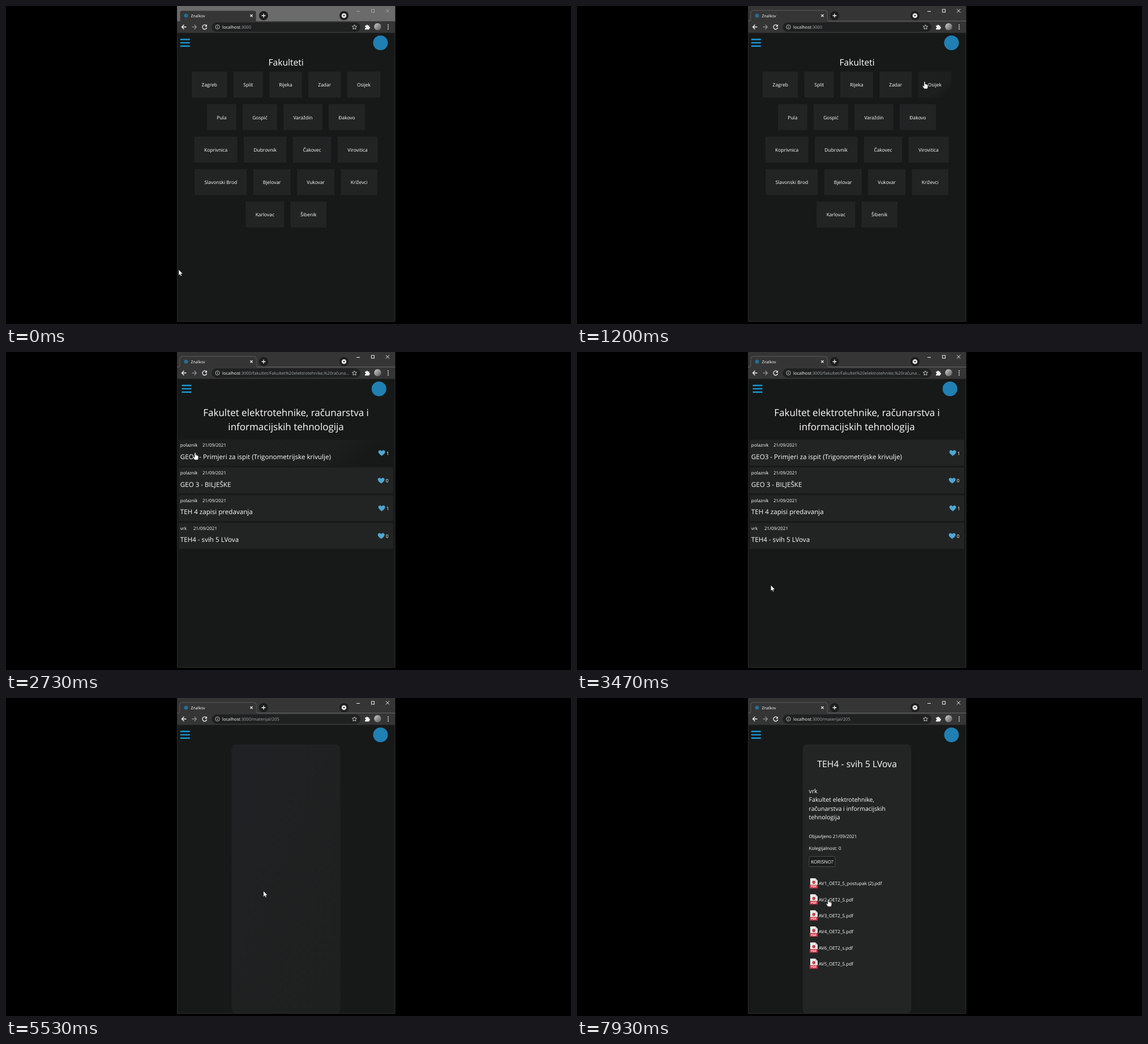
Write an HTML page that moves like this. It is 998x561 px and loops after 8 s.

```html
<!DOCTYPE html>
<html lang="hr">
<head>
<meta charset="utf-8">
<title>Fakulteti</title>
<style>
  html, body { margin: 0; width: 100%; height: 100%; overflow: hidden; background: #000; }
  svg { display: block; }
  text {
    font-family: "Open Sans", "Noto Sans", sans-serif; fill: #fff;
    text-rendering: geometricPrecision; pointer-events: none; white-space: pre;
  }
  .mid { text-anchor: middle; }
  .dim { fill: #a3a6a9; }
  .tile { fill: #222424; }
  .tile.on { fill: url(#hover); }
  .link { fill: transparent; }
  .line { fill: none; stroke: #f1f1f1; stroke-width: 1.3; }
  .bars { stroke: #179bd8; stroke-width: 2.4; }
  .brand { fill: #2080b3; }
  #strip { fill: #353535; }
  #controls { stroke: #f1f1f1; stroke-width: 1; fill: none; }
  .idle #strip { fill: #6b6b6b; }
  .idle #controls { stroke: #a5a5a5; }
  #cursor, #cursor * { pointer-events: none; }
</style>
</head>
<body>
<svg id="stage" width="998" height="561" viewBox="0 0 998 561">
  <defs>
    <linearGradient id="hover" gradientUnits="userSpaceOnUse">
      <stop stop-color="#1e2020"/><stop offset=".65" stop-color="#1d1f1f"/><stop offset=".85" stop-color="#171918"/>
    </linearGradient>
    <linearGradient id="loading" x2="1" y2="1">
      <stop stop-color="#202126"/><stop offset=".3" stop-color="#1f2122"/><stop offset="1" stop-color="#1e201f"/>
    </linearGradient>
    <linearGradient id="photo" x2="1" y2="1">
      <stop stop-color="#d0d0ce"/><stop offset="1" stop-color="#575755"/>
    </linearGradient>
    <path id="heart" d="M6 10.5C2 7.6 0 5.8 0 3.2 0 .2 4.2-.8 6 2 7.8-.8 12 .2 12 3.2 12 5.8 10 7.6 6 10.5z" fill="#4ba8d3"/>
    <g id="pdf">
      <path d="M1 0h9l4 4v13H1z" fill="#f0eeec"/>
      <path d="M10 0v4h4z" fill="#c4c1bf"/>
      <circle cx="7.3" cy="7.2" r="2.8" fill="#c9404b"/>
      <path d="M0 11.5h14.2v6.5H0z" fill="#c93a48"/>
      <text class="mid" x="7.1" y="16.6" font-size="5" font-weight="700">PDF</text>
    </g>
  </defs>

  <rect width="998" height="561"/>
  <rect x="302" width="385.5" height="557" fill="#171918"/>

  <g id="chrome">
    <rect id="strip" x="302" width="385.5" height="28"/>
    <rect x="302" y="27" width="385.5" height="20.5" fill="#353535"/>
    <path d="M302 26.5h2q3 0 3-3V12q0-4 4-4h127q4 0 4 4v11.5q0 3 3 3h242.5" fill="none" stroke="#666"/>
    <path d="M307.5 27V12q0-3.5 3.5-3.5h127q3.5 0 3.5 3.5v15z" fill="#353535"/>
    <circle class="brand" cx="318" cy="17" r="3.6" opacity=".75"/>
    <text x="326.5" y="19.5" font-size="7">Znalkov</text>
    <path class="line" d="M431.5 15l4 4m0-4l-4 4"/>
    <circle cx="455" cy="17" r="8" fill="#1c1d1d"/>
    <path class="line" d="M451.5 17h7M455 13.5v7"/>
    <circle cx="597" cy="17" r="8" fill="#1c1d1d"/>
    <circle cx="597" cy="17" r="4.3" fill="#e0e0e0"/>
    <path d="M595 16h4l-2 2.5z" fill="#222"/>
    <g id="controls">
      <path d="M619 9.5h6M671 5.5l6 6m0-6l-6 6"/>
      <rect x="645.5" y="6" width="5" height="5"/>
    </g>
    <path class="line" d="M318.5 37H310.5m4-4l-4 4 4 4"/>
    <path class="line" style="stroke:#898b8d" d="M328.5 37h8m-4-4l4 4-4 4"/>
    <path class="line" d="M354 34.7a3.9 3.9 0 1 0 .7 3.3"/>
    <path d="M355 32.5v4h-4z" fill="#f1f1f1"/>
    <rect x="363.5" y="29" width="262.5" height="16.5" rx="8.25" fill="#1f2020"/>
    <circle cx="373.5" cy="37" r="3.7" fill="none" stroke="#c8c8c8" stroke-width=".9"/>
    <path d="M373.5 36.5v2.5m0-4.2v.9" stroke="#c8c8c8"/>
    <text x="382" y="39.7" font-size="7.57">localhost<tspan class="dim" id="url"></tspan></text>
    <path d="M615.5 33l1.2 2.7 2.9.3-2.2 2 .6 2.9-2.5-1.5-2.5 1.5.6-2.9-2.2-2 2.9-.3z" fill="none" stroke="#ddd" stroke-width=".9"/>
    <path d="M634 34.5h2.3a1.5 1.5 0 0 1 3 0h2.2v2.2a1.5 1.5 0 0 1 0 3V41.5H634v-2.2a1.5 1.5 0 0 0 0-3z" fill="#f1f1f1"/>
    <circle cx="656.5" cy="36.5" r="6.2" fill="url(#photo)"/>
    <g fill="#f1f1f1"><circle cx="675" cy="33.5" r="1"/><circle cx="675" cy="37" r="1"/><circle cx="675" cy="40.5" r="1"/></g>
  </g>

  <path id="menu" class="bars" d="M307.8 59h17m-17 5.9h17m-17 5.9h17"/>
  <circle id="logo" class="brand" cx="661.5" cy="65" r="13"/>

  <g id="cities"></g>
  <g id="faculties"></g>
  <g id="posts"></g>
  <g id="post"></g>

  <path d="M302.5 47V556.5H687V47" fill="none" stroke="#2a2c2c"/>

  <g id="cursor">
    <path id="arrow" d="M0 0V10.3L2.4 8.2 3.9 11.6 5.6 10.9 4.1 7.6H7.3z" fill="#fff" stroke="#000" stroke-width=".5"/>
    <path id="hand" d="M-1 1Q0-.6 1 1V5q1.2-.8 1.8.3 1.2-.6 1.7.4 1.3-.3 1.3 1V10L4.8 13H-.7L-3.6 8.8Q-3.6 7.2-2.2 7.7L-1 9z" fill="#fff" stroke="#111" stroke-width=".5"/>
  </g>
</svg>

<script>
const LOOP = 8000, CENTER = 494.6;
const $ = id => document.getElementById(id);

const text = (x, mid, size, str, cls = "") =>
  `<text x="${x}" y="${mid + size * 0.36}" font-size="${size}" class="${cls}">${str}</text>`;
const rect = (x, y, w, h, rest) => `<rect x="${x}" y="${y}" width="${w}" height="${h}" ${rest}/>`;

// Rows of centred tiles; each tile is [label, width].
function tileRows(rows) {
  const gap = 11.3;
  return rows.map((row, i) => {
    const y = 115.8 + i * 57.3;
    let x = CENTER - (row.reduce((sum, tile) => sum + tile[1], 0) + gap * (row.length - 1)) / 2;
    return row.map(([label, w]) => {
      const out = rect(x, y, w, 45.8, 'class="tile hot"') + text(x + w / 2, y + 23.4, 8.45, label, "mid");
      x += w + gap;
      return out;
    }).join("");
  }).join("");
}

$("cities").innerHTML = text(CENTER, 99.5, 15.6, "Fakulteti", "mid") + tileRows([
  [["Zagreb", 62.5], ["Split", 52], ["Rijeka", 57.7], ["Zadar", 57.3], ["Osijek", 58.5]],
  [["Pula", 51.5], ["Gospić", 61], ["Varaždin", 68.5], ["Đakovo", 64]],
  [["Koprivnica", 76], ["Dubrovnik", 75.5], ["Čakovec", 67.5], ["Virovitica", 71]],
  [["Slavonski Brod", 92], ["Bjelovar", 66], ["Vukovar", 66.3], ["Križevci", 64.3]],
  [["Karlovac", 68], ["Šibenik", 63.3]]
]);

$("faculties").innerHTML = text(CENTER, 99.5, 15.6, "Osijek", "mid") + tileRows([
  [["Ekonomski fakultet", 110], ["Pravni fakultet", 95]],
  [["Fakultet elektrotehnike, računarstva i informacijskih tehnologija", 300]],
  [["Medicinski fakultet", 112], ["Filozofski fakultet", 110]],
  [["Građevinski i arhitektonski fakultet", 180]],
  [["Prehrambeno-tehnološki fakultet", 166]],
  [["Fakultet agrobiotehničkih znanosti", 178]],
  [["Odjel za matematiku", 118], ["Odjel za fiziku", 96]]
]);

const posts = [
  ["polaznik", 347, "GEO3 - Primjeri za ispit (Trigonometrijske krivulje)", 1],
  ["polaznik", 347, "GEO 3 - BILJEŠKE", 0],
  ["polaznik", 347, "TEH 4 zapisi predavanja", 1],
  ["vrk", 331, "TEH4 - svih 5 LVova", 0]
];
$("posts").innerHTML =
  text(CENTER, 107, 17, "Fakultet elektrotehnike, računarstva i", "mid") +
  text(CENTER, 131.5, 17, "informacijskih tehnologija", "mid") +
  `<g id="rows">${posts.map(([user, dateX, title, likes], i) => {
    const y = 154.8 + i * 48.8, heartX = 656.7 + likes;
    return rect(305, y, 379, 46, 'rx="2" class="tile hot"') +
      text(307.8, y + 9.5, 7.9, user) + text(dateX, y + 9.5, 7.9, "21/09/2021") +
      text(307.8, y + 29.8, 11.6, title) +
      `<use href="#heart" x="${heartX}" y="${y + 18}"/>` +
      text(heartX + 14, y + 23.7, 8.5, likes);
  }).join("")}</g>`;

const files = ["AV1_OET2_S_postupak (2)", "AV2_OET2_S", "AV3_OET2_S", "AV4_OET2_S", "AV6_OET2_s", "AV5_OET2_S"];
const about = ["vrk", "Fakultet elektrotehnike,", "računarstva i informacijskih", "tehnologija"];
$("post").innerHTML =
  rect(398.5, 81.7, 192, 475, 'rx="8" id="card"') +
  `<g id="details">` +
  text(CENTER, 116.8, 15.8, "TEH4 - svih 5 LVova", "mid") +
  about.map((line, i) => text(409.6, 164 + i * 15.4, 10.55, line)).join("") +
  text(409.6, 243.7, 8.05, "Objavljeno 21/09/2021") +
  text(409.6, 264.8, 8.1, "Kolegijalnost: 0") +
  rect(410, 279.5, 46, 18, 'rx="2" fill="#1b1d1d" stroke="#4b4d4d"') +
  text(433, 288.9, 8.3, "KORISNO?", "mid") +
  files.map((name, i) => {
    const y = 327.4 + i * 28.35;
    return `<use href="#pdf" x="411" y="${y - 9.5}"/>` + text(427, y, 8.14, name + ".pdf") +
      rect(411, y - 10, i ? 79 : 128, 20, 'class="link hot"');
  }).join("") + `</g>`;

// [start, page, address after the host]
const pages = [
  [0, "cities", ":3000"],
  [1330, "faculties", ":3000/grad/Osijek"],
  [2330, "posts", ":3000/fakultet/Fakultet%20elektrotehnike,%20računa..."],
  [5470, "post", ":3000/materijal/205"]
];

// Pointer tip: [time, x, y]
const path = [
  [0, 305, 465], [70, 305, 465], [870, 614, 133], [1330, 614, 133], [1730, 560, 150],
  [2070, 352, 183], [2660, 352, 183], [2730, 334, 177], [3530, 343, 430], [3600, 343, 431],
  [4530, 343, 431], [4600, 358.5, 415], [5130, 455, 340], [5530, 455, 340], [5730, 400, 420],
  [6000, 353, 451], [6200, 353, 451], [6330, 348.5, 448], [6600, 348.5, 448], [7000, 364, 395.5],
  [7470, 433, 346], [7600, 440, 346], [7800, 440, 346], [7930, 444, 355], [LOOP, 444, 355]
];

function pointerAt(t) {
  const i = path.findIndex(key => key[0] > t);
  const [t0, x0, y0] = path[i - 1], [t1, x1, y1] = path[i];
  const k = (t - t0) / (t1 - t0);
  return [x0 + (x1 - x0) * k, y0 + (y1 - y0) * k];
}

const show = (id, on) => { $(id).style.display = on ? "" : "none"; };

// Lays the hover gradient at 45 degrees across the box, corner to corner.
function highlight(el) {
  const { x, y, width, height } = el.getBBox();
  const cx = x + width / 2, cy = y + height / 2, r = (width + height) / 4;
  const ends = { x1: cx - r, y1: cy - r, x2: cx + r, y2: cy + r };
  for (const key in ends) $("hover").setAttribute(key, ends[key]);
  el.classList.add("on");
}

function draw(now) {
  const t = now % LOOP;
  const [, page, url] = pages.filter(p => p[0] <= t).pop();
  pages.forEach(p => show(p[1], p[1] === page));
  $("url").textContent = url;
  $("chrome").classList.toggle("idle", t < 930);

  // The post list is inset a little by its page padding.
  const inset = page === "posts" ? 2.7 : 0;
  $("menu").setAttribute("transform", `translate(${inset})`);
  $("logo").setAttribute("transform", `translate(${-inset})`);

  const loaded = t >= 5870;
  show("rows", t >= 2730);
  show("details", loaded);
  $("card").setAttribute("fill", loaded ? "#232525" : "url(#loading)");

  const [x, y] = pointerAt(t);
  const under = document.elementFromPoint(x, y);
  const hot = under && under.closest(".hot");
  document.querySelectorAll(".on").forEach(el => el !== hot && el.classList.remove("on"));
  if (hot) highlight(hot);
  show("hand", hot);
  show("arrow", !hot);
  $("cursor").setAttribute("transform", `translate(${x} ${y})`);
}

const start = performance.now();
function tick() {
  draw(performance.now() - start);
  requestAnimationFrame(tick);
}
tick();
</script>
</body>
</html>
```
